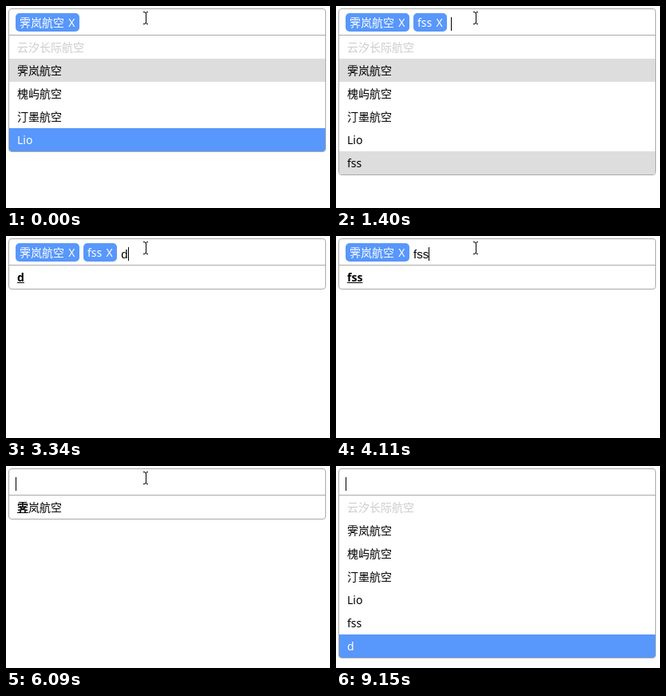
An HTML page for the animation above (9250 ms loop, 406x253 px).

```html
<!DOCTYPE html>
<html lang="zh">
<head>
<meta charset="utf-8">
<style>
  html, body { margin: 0; width: 100%; height: 100%; overflow: hidden; background: #fff; }
  #stage {
    position: relative; width: 406px; height: 253px; overflow: hidden; background: #fff; color: #000;
    font: 14px/29px "Noto Sans", "Noto Sans CJK SC", sans-serif; white-space: nowrap;
  }
  #box {
    position: absolute; left: 3px; top: 3px; width: 398px; box-sizing: border-box;
    border: 1px solid #aaa; border-radius: 4px; padding-top: 32px; overflow: hidden;
  }
  #list { border-top: 1px solid #aaa; }
  #list div { height: 29px; padding-left: 10px; }
  #list .disabled { color: #ccc; }
  #list .selected { background: #ddd; }
  #list .hover { background: #5897fb; color: #fff; }
  b { text-decoration: underline; }
  #field { position: absolute; left: 12px; top: 9px; display: flex; gap: 5px; }
  .tag {
    height: 23px; line-height: 23px; padding: 0 5.5px 0 5px; border-radius: 5px;
    background: #5897fb; color: #fff;
  }
  .tag i { font-style: normal; margin-left: 5.3px; }
  .input {
    display: flex; height: 17px; margin-top: 5px;
    font: 15px/17px "Liberation Sans", "Noto Sans CJK SC", sans-serif;
  }
  .caret { width: 1px; height: 17px; background: #000; }
  svg { position: absolute; left: 0; top: 0; }
  #beam { mix-blend-mode: difference; }
</style>
</head>
<body>
<div id="stage">
  <div id="box"><div id="list"></div></div>
  <div id="field"></div>
  <svg id="beam" width="9" height="17" shape-rendering="crispEdges">
    <path d="M1 .5h2M5 .5h2M3 1.5h2M4.5 1v14M3 14.5h2M1 15.5h2M5 15.5h2" transform="translate(0 0)" stroke="#fff" fill="none"/>
  </svg>
  <svg id="arrow" width="14" height="21">
    <path d="M.5 .5v16l3.7-3.6 2.6 6 2.3-1-2.6-5.8h5z" fill="#fff" stroke="#000"/>
  </svg>
</div>
<script>
const LOOP = 9250;
const AIR = '霁岚航空';
const ITEMS = ['云汐长际航空', AIR, '槐屿航空', '汀墨航空', 'Lio', 'fss', 'd'];
const $ = id => document.getElementById(id);

// Each step changes only the listed parts of the state; the list filter lags behind the input.
const STEPS = [
  [0, { tags: [AIR], input: '', filter: '', count: 5, hover: 'Lio', caret: false, beam: [171, 7], arrow: null }],
  // type and add "fss"
  [430, { input: 'f', caret: true }],
  [570, { input: 'fs', filter: 'f', hover: '' }],
  [710, { input: 'fss', filter: 'fs' }],
  [850, { filter: 'fss' }],
  [1250, { tags: [AIR, 'fss'], input: '', count: 6 }],
  [1400, { filter: '' }],
  // type and add "d"
  [1650, { input: 'd' }],
  [1770, { filter: 'd' }],
  [2200, { tags: [AIR, 'fss', 'd'], input: '', count: 7 }],
  [2350, { filter: '' }],
  [2880, { caret: false }],
  // backspace through every tag
  [3190, { tags: [AIR, 'fss'], input: 'd', caret: true }],
  [3340, { filter: 'd' }],
  [3590, { input: '' }],
  [3710, { filter: '' }],
  [3960, { tags: [AIR], input: 'fss' }],
  [4110, { filter: 'fss' }],
  [4260, { input: 'fs' }],
  [4390, { filter: 'fs' }],
  [4530, { input: 'f' }],
  [4660, { filter: 'f' }],
  [4800, { input: '' }],
  [4930, { filter: '' }],
  [5070, { tags: [], input: AIR }],
  [5200, { filter: AIR }],
  [5360, { input: AIR.slice(0, 3) }],
  [5500, { filter: AIR.slice(0, 3) }],
  [5650, { input: AIR.slice(0, 2) }],
  [5790, { filter: AIR.slice(0, 2) }],
  [5940, { input: AIR[0], filter: AIR[0] }],
  [6090, { input: '' }],
  [6210, { filter: '' }],
  // blinking caret, pointer leaves and passes over the last row
  [6520, { caret: false }],
  [7080, { caret: true }],
  [7380, { beam: [215, 5] }],
  [7510, { beam: [262, 1] }],
  [7640, { beam: [300, -5], caret: false }],
  [7770, { beam: null }],
  [8200, { caret: true, arrow: [372, 226], hover: 'd' }],
  [8330, { arrow: [382, 231] }],
  [8460, { arrow: [394, 236] }],
  [8590, { arrow: null, caret: false }],
  [9150, { caret: true }]
];

function place(el, pos) {
  el.style.display = pos ? 'block' : 'none';
  if (pos) el.style.transform = `translate(${pos[0]}px, ${pos[1]}px)`;
}

function rowHtml(name, { tags, filter, hover }) {
  const kind = name === hover ? 'hover'
    : tags.includes(name) ? 'selected'
    : name === ITEMS[0] ? 'disabled' : '';
  const label = filter ? `<b>${filter}</b>${name.slice(filter.length)}` : name;
  return `<div class="${kind}">${label}</div>`;
}

function render(state) {
  const matches = ITEMS.slice(0, state.count).filter(name => name.startsWith(state.filter));
  const rows = matches.length ? matches : [state.filter];
  $('list').innerHTML = rows.map(name => rowHtml(name, state)).join('');
  $('field').innerHTML =
    state.tags.map(name => `<div class="tag">${name}<i>X</i></div>`).join('') +
    `<div class="input">${state.input}${state.caret ? '<div class="caret"></div>' : ''}</div>`;
  place($('beam'), state.beam);
  place($('arrow'), state.arrow);
}

let shown = 0;
function tick() {
  const time = performance.now() % LOOP;
  const past = STEPS.filter(([start]) => start <= time);
  if (past.length !== shown) {
    shown = past.length;
    render(Object.assign({}, ...past.map(([, change]) => change)));
  }
  requestAnimationFrame(tick);
}
tick();
</script>
</body>
</html>
```
